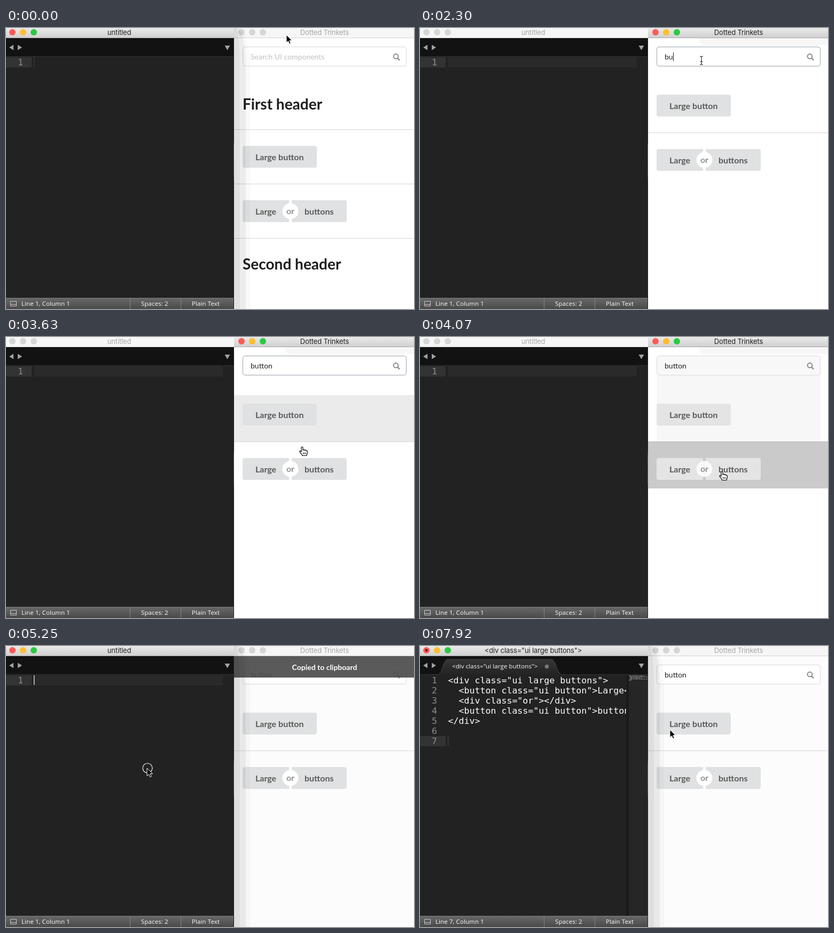
Recreate the animation shown at these times as an HTML page. Size 764 by 527 pixels, loop 8 s.

```html
<!DOCTYPE html>
<html lang="en">
<head>
<meta charset="utf-8">
<title>Editor and component browser</title>
<style>
html, body { margin: 0; width: 100%; height: 100%; overflow: hidden; background: #222; }
svg { display: block; }
text { white-space: pre; }
.title { font: 13px Inter, sans-serif; letter-spacing: -.15px; text-anchor: middle; }
.mono { font: 16.6px "DejaVu Sans Mono", monospace; fill: #fff; }
.num { fill: #8d8d8d; text-anchor: end; }
.small { font: 500 11.5px "Open Sans", sans-serif; letter-spacing: .1px; fill: #fff; }
.field { font: 14px Lato, sans-serif; }
.btn { font: 700 16px Lato, sans-serif; fill: #595959; }
.head { font: 700 28px Lato, sans-serif; fill: #1e1e1e; }
.note { font: 700 14px Lato, sans-serif; fill: #fff; text-anchor: middle; }
</style>
</head>
<body>
<svg id="stage" width="764" height="527" viewBox="0 0 764 527">
  <defs>
    <linearGradient id="bar" x2="0" y2="1"><stop stop-color="#eaeaea"/><stop offset="1" stop-color="#d0d0d0"/></linearGradient>
    <linearGradient id="foot" x2="0" y2="1"><stop stop-color="#686868"/><stop offset="1" stop-color="#494949"/></linearGradient>
    <linearGradient id="tabFill" x2="0" y2="1"><stop stop-color="#363636"/><stop offset="1" stop-color="#232323"/></linearGradient>
    <linearGradient id="seam" x2="0" y2="1">
      <stop offset=".38" stop-color="#20202a"/><stop offset=".4" stop-color="#8a4128"/>
      <stop offset=".5" stop-color="#7a3824"/><stop offset=".53" stop-color="#202028"/>
    </linearGradient>
  </defs>

  <!-- component browser -->
  <rect id="page" x="427" width="337" height="527"/>
  <path id="strip" d="M427 19H516Q523 19 523 25Q524 29 530 32H764V19Z" fill="#f7f7f7"/>
  <path id="stripLeft" d="M427 19H516Q523 19 523 25V32H427Z" fill="#fff"/>
  <rect id="wash" x="443" y="72" width="307" height="124" fill="#f7f7f7"/>
  <rect id="hover1" x="427" y="109" width="337" height="87"/>
  <rect id="hover2" x="427" y="197" width="337" height="87"/>
  <rect id="box" x="443.5" y="35.5" width="306" height="36" rx="4"/>
  <text id="query" class="field" x="458" y="59"></text>
  <rect id="fieldCaret" y="46" width="1" height="16" fill="#111"/>
  <g fill="none" stroke="#8a8a8a" stroke-width="2"><circle cx="730" cy="53.2" r="4.4"/><path d="M733.3 56.5L737 60.3" stroke-width="2.4"/></g>
  <g id="heads">
    <text class="head" x="443" y="153">First header</text>
    <text class="head" x="443" y="453">Second header</text>
    <path d="M427 190.5H764M427 394.5H764" stroke="#d6d6d6"/>
  </g>
  <g id="list">
    <path id="rule" d="M427 292.5H764"/>
    <g id="buttons">
      <rect x="443" y="221" width="139" height="41" rx="4"/>
      <path d="M447 323H530V364H447Q443 364 443 360V327Q443 323 447 323Z"/>
      <path d="M535 323H634Q638 323 638 327V360Q638 364 634 364H535Z"/>
    </g>
    <circle id="orDisc" cx="532.5" cy="343.5" r="15" fill="#fff"/>
    <text class="btn" x="467" y="248">Large button</text>
    <text class="btn" x="467" y="350">Large</text>
    <text class="btn" x="559" y="350">buttons</text>
    <text class="btn" x="532.5" y="349" text-anchor="middle" style="fill:#929292">or</text>
  </g>
  <g id="note">
    <rect x="427" y="19" width="337" height="40" fill="#4c4c4c" opacity=".92"/>
    <path d="M427 59.5H764" stroke="#000" opacity=".12"/>
    <text class="note" x="596.5" y="45">Copied to clipboard</text>
  </g>
  <rect id="barR" x="427" width="337" height="18"/>
  <path id="edgeR" d="M427 18.5H764"/>
  <g id="dotsR"></g>
  <text id="nameR" class="title" x="596.5" y="13">Dotted Trinkets</text>
  <g id="shade"></g>

  <!-- text editor -->
  <rect width="427" height="527" fill="#222"/>
  <rect id="barL" width="427" height="18"/>
  <path id="edgeL" d="M0 18.5H427"/>
  <g id="dotsL"></g>
  <circle id="unsaved" cx="12" cy="8" r="2.2" fill="#5c0d09"/>
  <text id="nameL" class="title" x="212" y="13"></text>
  <rect y="19" width="427" height="34" fill="#121212"/>
  <path d="M0 53.5H427" stroke="#343434"/>
  <path d="M14 31.5V41.5L6 36.5ZM22 31.5V41.5L30 36.5ZM409.500 33H419.500L414.500 41.500Z" fill="#a2a2a2"/>
  <g id="tab">
    <path d="M33 54C43 52 42 25 53 25H245C256 25 255 52 266 54Z" fill="url(#tabFill)" stroke="#454545"/>
    <rect x="34" y="53" width="231" height="2" fill="#232323"/>
    <text class="small" x="60" y="42">&lt;div class="ui large buttons"&gt;</text>
    <circle cx="237.500" cy="38.500" r="3.800" fill="#777"/>
  </g>
  <rect id="row" x="52" y="55" width="354" height="19" fill="#2a2a2a"/>
  <rect id="gutter" width="48" height="19" fill="#333"/>
  <g id="nums"></g>
  <svg id="code" width="391" height="506"></svg>
  <g id="map">
    <rect x="386" y="54" width="5" height="452" fill="#1b1b1b"/>
    <rect x="391" y="54" width="35" height="452" fill="#262626"/>
  </g>
  <rect id="caret" width="1.2" height="18"/>
  <rect y="507" width="427" height="20" fill="url(#foot)"/>
  <path d="M0 506.500H427" stroke="#777"/>
  <path d="M232.500 507V527M327.500 507V527" stroke="#858585"/>
  <path d="M8.500 512.500H19.500V521.500H8.500ZM8.500 518.500H19.500" fill="none" stroke="#c8c8c8"/>
  <text id="place" class="small" x="29" y="521"></text>
  <text class="small" x="253" y="521">Spaces: 2</text>
  <text class="small" x="348" y="521">Plain Text</text>
  <rect x="426" y="19" width="1" height="508" fill="url(#seam)"/>

  <!-- pointer -->
  <g id="pointer">
    <circle id="ring" r="9" cx="1" fill="none" stroke="#fff" stroke-width="1.200"/>
    <path id="arrow" d="M0 0V14.500L3.400 11.500 5.800 16.800 8.200 15.700 5.900 10.500H10.500Z" fill="#000" stroke="#fff"/>
    <g id="beam" fill="none">
      <path d="M-3 -8Q0 -8 0 -6V6Q0 8 -3 8M3 -8Q0 -8 0 -6M0 6Q0 8 3 8M-2 2H2" stroke="#fff" stroke-width="2.600"/>
      <path d="M-3 -8Q0 -8 0 -6V6Q0 8 -3 8M3 -8Q0 -8 0 -6M0 6Q0 8 3 8M-2 2H2" stroke="#000"/>
    </g>
    <g id="hand">
      <path d="M-2 1.500C-2 -.5 1 -.5 1 1.500V6C2 5 4 5 4.200 6.500C5.500 5.500 7 6 7 7.500C8.500 7 9.500 7.500 9.500 9C9.500 12 8.500 13 8 16.500H0C-1 13.500 -4 11.500 -5 9C-5.500 7.500 -3.800 7 -2 9Z" fill="#fff" stroke="#000" stroke-width="1.200"/>
      <path d="M1.500 10.500V14M3.800 10.500V14M6 10.500V14" stroke="#000" stroke-width=".9"/>
    </g>
  </g>
</svg>
<script>
const LOOP = 8000;
const $ = id => document.getElementById(id);
const set = (id, attrs) => { for (const k in attrs) $(id).setAttribute(k, attrs[k]); };
const show = (id, on) => { $(id).style.display = on ? '' : 'none'; };
const at = (table, t) => table.filter(row => row[0] <= t).pop();
const esc = s => s.replace(/</g, '&lt;');

const LINES = [
  '<div class="ui large buttons">',
  '  <button class="ui button">Large</button>',
  '  <div class="or"></div>',
  '  <button class="ui button">buttons</button>',
  '</div>'
];
const LIGHTS = ['#fc5b57', '#fdbe2f', '#29cb42'];

// time, x, y, shape
const POINTER = [
  [0, 525, 13, 'arrow'], [510, 525, 17, 'arrow'], [660, 526, 31, 'arrow'],
  [810, 527, 50, 'beam'], [960, 527, 61, 'beam'],
  [3190, 536, 104, 'arrow'], [3340, 545, 169, 'hand'], [3490, 555, 206, 'hand'],
  [3640, 563, 236, 'hand'], [3780, 566, 252, 'hand'],
  [4950, 480, 241, 'arrow'], [5100, 330, 232, 'arrow'], [5250, 264, 229, 'arrow'],
  [5400, 258, 229, 'arrow'], [5550, 242, 229, 'arrow'], [5700, 230, 229, 'arrow'],
  [6300, 240, 224, 'arrow'], [6590, 260, 220, 'arrow'], [6740, 281, 215, 'arrow'],
  [6880, 290, 214, 'arrow'], [7770, 392, 180, 'arrow'], [7920, 468, 157, 'arrow']
];
const TYPED = [[0, ''], [2300, 'bu'], [2450, 'but'], [2600, 'butt'], [2740, 'butto'], [2890, 'button']];
const HOVER1 = [[0, 'none'], [3340, '#ebebeb'], [3640, '#f2f2f2'], [3780, '#f7f7f7'], [3930, 'none']];
const HOVER2 = [[0, 'none'], [3640, '#f0f0f0'], [3780, '#ebebeb'], [3930, '#dadada'], [4070, '#cacaca'],
  [4360, '#d8d8d8'], [4510, '#ebebeb'], [4950, 'none']];
const NOTE = [[0, 0], [4360, .5], [4510, 1], [5700, .7], [5850, .35], [6000, 0]];
const CARET = [[0, '#3a3a3a'], [510, 'none'], [5250, '#fff'], [6590, 'none'], [6880, '#fff'], [7920, '#444']];
const LINE = [[0, 1], [6000, 5], [7170, 6], [7320, 7]];

function build() {
  for (const [id, x0] of [['dotsL', 12], ['dotsR', 441]])
    $(id).innerHTML = LIGHTS.map((c, i) => `<circle cx="${x0 + i * 20}" cy="8" r="6"/>`).join('');
  $('shade').innerHTML = [[11, .05], [22, .05], [30, .025]].map(([w, a]) =>
    `<path d="M427 0H${427 + w * .4}Q${427 + w} 20 ${427 + w} 72V527H427Z" opacity="${a}"/>`).join('');
  $('code').innerHTML = LINES.map((s, i) =>
    `<text class="mono" x="52.500" y="${70 + i * 19}">${esc(s)}</text>`).join('');
  $('nums').innerHTML = [1, 2, 3, 4, 5, 6, 7].map(n =>
    `<text class="mono num" x="32" y="${51 + n * 19}">${n}</text>`).join('');
  $('map').innerHTML += LINES.map((s, i) => {
    const pad = s.search(/\S/);
    return `<path d="M${391 + pad} ${56 + i * 2}H${Math.min(426, 391 + s.length)}" stroke="#9a9a9a" stroke-dasharray="5 1 3 1"/>`;
  }).join('');
}

function chrome(side, active) {
  set('bar' + side, { fill: active ? 'url(#bar)' : '#f6f6f6' });
  set('edge' + side, { stroke: active ? '#a8a8a8' : '#d3d3d3' });
  set('name' + side, { fill: active ? '#222' : '#a6a6a6' });
  [...$('dots' + side).children].forEach((dot, i) => dot.setAttribute('fill', active ? LIGHTS[i] : '#d6d6d6'));
}

function render(t) {
  const left = t < 510 || t >= 5250;
  const filtered = t >= 2300;
  const pasted = t >= 6000;
  const pressed = t >= 3930 && t < 4360;
  const focused = t >= 960 && t < 3930;
  const typed = at(TYPED, t)[1];
  const line = at(LINE, t)[1];

  chrome('L', left);
  chrome('R', !left);
  show('shade', left);
  show('strip', !left);
  show('stripLeft', !left);
  set('page', { fill: t >= 5250 ? '#fcfcfc' : '#fff' });

  $('query').textContent = typed || 'Search UI components';
  set('query', { fill: typed ? '#222' : '#bfbfbf' });
  set('box', { fill: pressed ? '#f8f8f8' : '#fff', stroke: focused ? '#9aa3ab' : '#d9d9d9' });
  show('fieldCaret', t >= 1100 && t < 1550 || t >= 2000 && t < 3190);
  set('fieldCaret', { x: 458 + (typed ? Math.round($('query').getComputedTextLength()) : 0) });

  show('heads', !filtered);
  set('list', { transform: `translate(0 ${filtered ? -96 : 0})` });
  set('rule', { stroke: pressed ? '#b5b5b5' : '#d6d6d6' });
  set('buttons', { fill: pressed ? '#e4e4e4' : '#e0e1e2' });
  set('orDisc', { opacity: pressed ? .82 : 1 });
  show('wash', pressed);
  set('hover1', { fill: at(HOVER1, t)[1] });
  set('hover2', { fill: at(HOVER2, t)[1] });
  set('note', { opacity: at(NOTE, t)[1] });

  $('nameL').textContent = pasted ? LINES[0] : 'untitled';
  for (const id of ['unsaved', 'tab', 'code', 'map']) show(id, pasted);
  show('row', t >= 510 && !pasted);
  set('gutter', { y: 36 + line * 19 });
  [...$('nums').children].forEach((n, i) => { n.style.display = i < line ? '' : 'none'; });
  set('caret', { x: line === 5 ? 112.4 : 52, y: 36 + line * 19, fill: at(CARET, t)[1] });
  $('place').textContent = `Line ${line}, Column ${line === 5 ? 7 : 1}`;

  const [, x, y, shape] = at(POINTER, t);
  set('pointer', { transform: `translate(${x} ${y})` });
  for (const id of ['arrow', 'beam', 'hand']) show(id, id === shape);
  show('ring', t >= 5250 && t < 5400);
}

build();
const start = performance.now();
function tick() {
  render((performance.now() - start) % LOOP);
  requestAnimationFrame(tick);
}
tick();
</script>
</body>
</html>
```
